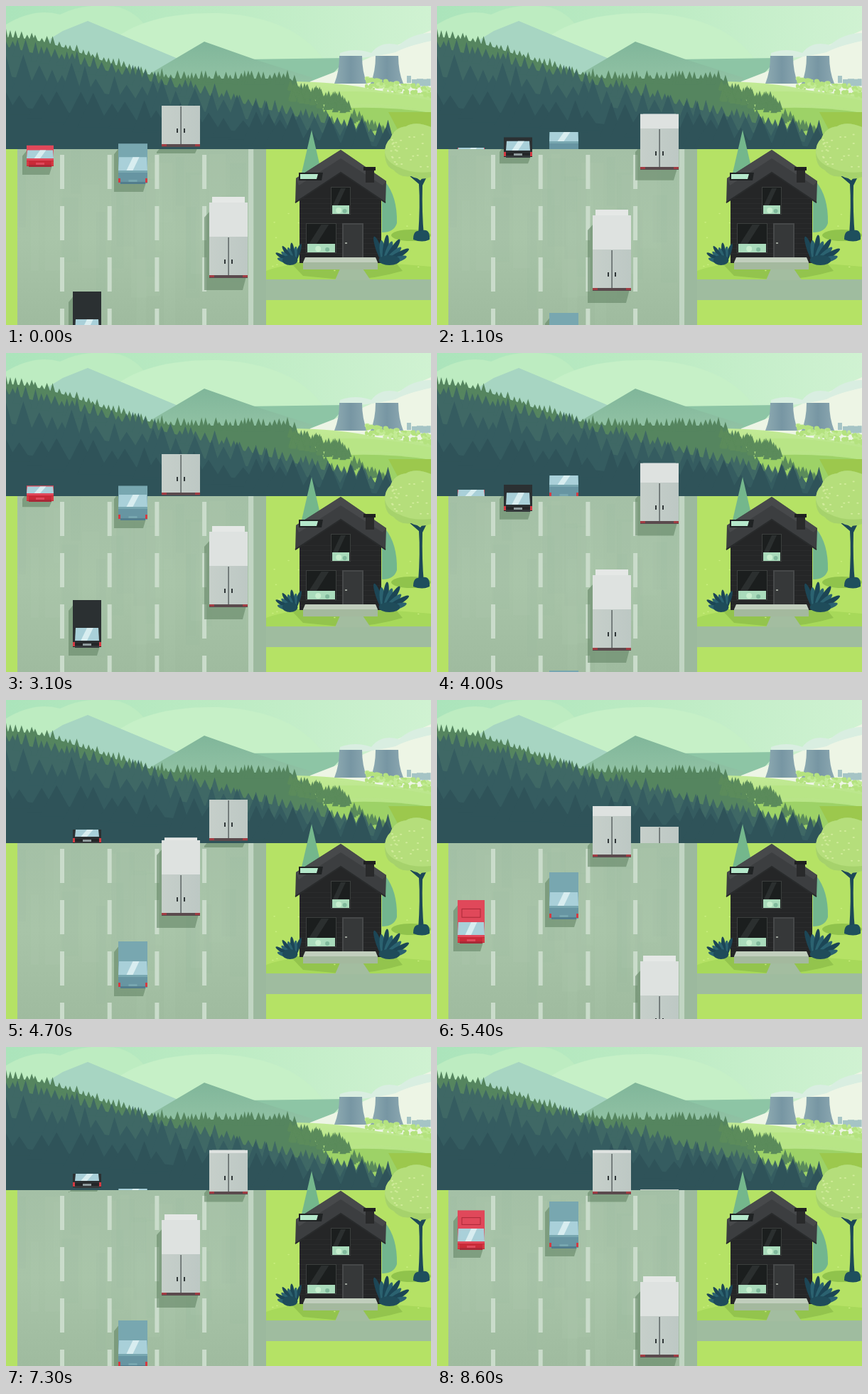
Recreate the animation shown at these times as an HTML page with a canvas. Size 598 by 448 pixels, loop 8700 ms.

```html
<!DOCTYPE html>
<html lang="en">
<head>
<meta charset="utf-8">
<title>Motorway and house</title>
<style>
html, body { margin: 0; width: 100%; height: 100%; overflow: hidden; background: #a3bfa5; }
canvas { display: block; width: 598px; height: 448px; }
</style>
</head>
<body>
<canvas id="stage" width="598" height="448"></canvas>
<script>
const W = 598, H = 448, HORIZON = 201, LOOP = 8700, STEP = 100, LAP = 29;
const stage = document.getElementById('stage').getContext('2d');
const backdrop = document.createElement('canvas');
backdrop.width = W;
backdrop.height = H;
let c = backdrop.getContext('2d');

const clamp = (v, lo, hi) => Math.max(lo, Math.min(hi, v));
const smooth = u => { u = clamp(u, 0, 1); return u * u * (3 - 2 * u); };

function rng(seed) {
  return () => (seed = (seed * 16807) % 2147483647) / 2147483647;
}
function rect(x, y, w, h, fill) {
  c.fillStyle = fill;
  c.fillRect(x, y, w, h);
}
function poly(fill, ...p) {
  c.fillStyle = fill;
  c.beginPath();
  for (let i = 0; i < p.length; i += 2) c.lineTo(p[i], p[i + 1]);
  c.fill();
}
function shape(fill, d) {
  c.fillStyle = fill;
  c.fill(new Path2D(d));
}
function oval(x, y, rx, ry, fill, turn = 0) {
  c.fillStyle = fill;
  c.beginPath();
  c.ellipse(x, y, rx, ry, turn, 0, 7);
  c.fill();
}
function line(color, width, d) {
  c.strokeStyle = color;
  c.lineWidth = width;
  c.stroke(new Path2D(d));
}
function shade(x0, y0, x1, y1, ...stops) {
  const g = c.createLinearGradient(x0, y0, x1, y1);
  stops.forEach((s, i) => g.addColorStop(i / (stops.length - 1), s));
  return g;
}
function clipTo(y, h, draw) {
  c.save();
  c.beginPath();
  c.rect(0, y, W, h);
  c.clip();
  draw();
  c.restore();
}

function fir(x, y, w, h, fill) {
  poly(fill, x, y - h, x + w / 2, y + h * 0.4, x - w / 2, y + h * 0.4);
}
// A band of firs on a ridge, filled down to the horizon
function firBand(ridge, end, w, h, fill, seed) {
  const rand = rng(seed), crest = [];
  for (let x = 0; x <= end; x += 10) crest.push(x, ridge(x));
  poly(fill, ...crest, end, HORIZON, 0, HORIZON);
  for (let x = 0; x < end; x += w * (0.4 + rand() * 0.5)) {
    fir(x, ridge(x) + 3, w * (0.8 + rand() * 0.5), h * (0.5 + rand() * 0.6), fill);
  }
}
// Loose firs scattered along a slope
function firClump(x0, x1, y, slope, depth, count, seed) {
  const rand = rng(seed);
  for (let i = 0; i < count; i++) {
    const x = x0 + rand() * (x1 - x0);
    fir(x, y + (x - x0) * slope + rand() * depth, 9, 10, '#5b8b5b');
  }
}

function drawSky() {
  rect(0, 0, W, HORIZON, shade(0, 0, 598, 60, '#abe4bb', '#bcebc3', '#d0f2d2'));
  shape('#bdecc1', 'M0 26Q40 2 76 12Q112 -6 160 2Q190 12 200 36L200 90H0Z');
  shape('#c6f0c7', 'M150 48Q200 8 300 10Q405 16 446 74L440 110H150Z');
  poly('#a7d5c2', 115, 21, 242, 74, 270, 110, 0, 110, 62, 46, 80, 35);
  poly('#8dc5a5', 335, 75, 480, 73, 448, 108, 350, 112);
  poly(shade(0, 50, 0, 105, '#80b69a', '#91c2a4'), 279, 50, 350, 75, 432, 101, 420, 115, 190, 112, 206, 93);
}

function drawValley() {
  shape('#edf5e5', 'M428 106L490 82L598 34V125H420Z');
  shape('#d9eee1', 'M470 66Q492 58 514 66Q528 48 553 55Q572 38 598 38V49Q565 56 548 65Q510 74 470 74Z');
  shape(shade(0, 106, 0, 200, '#c2ea96', '#a8db70'), 'M395 106Q470 106 520 118Q560 124 598 125V201H395Z');
  shape('#b8e586', 'M430 125Q500 112 598 133V150Q520 128 430 145Z');
  shape('#9dd267', 'M440 146Q520 138 598 150V201H500Z');
  for (const m of [485, 536]) {
    shape(shade(m - 23, 0, m + 23, 0, '#8eabb2', '#7796a3', '#8ca8b1'),
      `M${m - 16} 70H${m + 16}Q${m + 16} 92 ${m + 23} 109H${m - 23}Q${m - 16} 92 ${m - 16} 70Z`);
  }
  const rand = rng(41);
  for (let x = 564; x < W; x += 7) rect(x, 98 + rand() * 5, 4 + rand() * 5, 10, '#a5c4c5');
  for (let i = 0; i < 110; i++) {
    const x = 506 + rand() * 92;
    oval(x, 101 + (x - 506) * 0.13 + rand() * 14, 1.5 + rand() * 3, 1.5 + rand() * 2, i % 3 ? '#b4e27f' : '#c2eb94');
  }
}

function drawForest() {
  firBand(x => 44 + 58 * smooth(x / 250) + Math.max(0, x - 400), 490, 11, 14, '#55855f', 7);
  firClump(400, 484, 112, 0.24, 18, 90, 92);
  firClump(486, 545, 150, 0.6, 10, 28, 15);
  firBand(x => 57 + 0.24 * x, 540, 16, 20, '#3f6865', 23);
  firBand(x => 98 + 0.18 * x, 546, 30, 36, '#355c60', 58);
  firBand(x => 140 + 0.11 * x, 546, 38, 38, '#2f5359', 77);
}

function drawGround() {
  rect(0, HORIZON, W, H, '#b5e265');
  rect(16, HORIZON, 350, H, shade(0, 200, 0, 448, '#a4c0a6', '#a8c4a8', '#9fbb9f'));
  const rand = rng(16);
  for (let i = 0; i < 28; i++) {
    rect(18 + rand() * 300, HORIZON + rand() * 90, 8 + rand() * 20, 60 + rand() * 120,
      i % 2 ? 'rgba(175,202,172,.15)' : 'rgba(145,177,152,.12)');
  }
  rect(349, HORIZON, 17, H, '#9cb99e');
  for (let lane = 0; lane < 4; lane++) {
    for (let y = 209; y < H; y += 72) rect(76 + lane * 66.7, y, 6, 48, '#cadccb');
  }
  rect(341, HORIZON, 7, H, '#c1d5c3');
  poly('#9cc84d', 538, 149, 598, 149, 598, 201, 566, 201);
  shape('#a7d95a', 'M366 372Q420 350 598 366V384H366Z');
  shape('#93c44d', 'M400 360H548L558 372Q510 386 470 384L418 379Z');
  rect(366, 384, 232, 29, '#9fbc9f');
  poly('#a3bda0', 470, 369, 502, 369, 513, 385, 463, 385);
  for (let i = 0; i < 24; i++) oval(374 + rand() * 218, 285 + rand() * 96, 1.3, 0.8, '#caee80');
}

// A fan of pointed leaves spreading to one side
function drawBush(x, y, size, side) {
  for (let i = 0; i < 8; i++) {
    const a = -Math.PI / 2 + side * (i * 0.23 - 0.35), r = size * (i % 2 ? 0.45 : 0.55);
    oval(x + Math.cos(a) * r, y + Math.sin(a) * r, r, size * 0.11, i % 2 ? '#2b6270' : '#1c4656', a);
  }
  oval(x + side * size * 0.2, y - 5, size * 0.4, 7, '#1f4c5a');
}

function drawGarden() {
  poly('#74b78c', 430, 174, 446, 243, 414, 243);
  shape('#72b68f', 'M533 246Q551 268 550 305Q546 318 529 318V246Z');
  oval(570, 322, 28, 8, '#90c34c');
  shape('#1d4858', 'M580 322Q583 280 581 250L567 238L570 236L583 245L590 236L593 238L586 252Q585 290 588 322Z');
  shape('#1e4f5d', 'M573 328Q573 314 583 316Q597 311 596 328Q586 333 573 328Z');
  shape('#a6d26c', 'M533 208Q533 193 541 186Q546 171 563 169Q576 161 598 170V240Q584 246 570 239Q555 242 545 230Q534 226 533 208Z');
  shape('#b5de7b', 'M533 206Q533 193 541 186Q546 171 563 169Q576 161 598 170V233Q570 236 552 226Q536 220 533 206Z');
  const rand = rng(34);
  for (let i = 0; i < 28; i++) oval(542 + rand() * 54, 180 + rand() * 50, 1.6, 1, '#d1ec9b');
}

function drawWindow(x, y, w, h) {
  const sill = y + h - 13;
  rect(x, y, w, h, '#3c3f3e');
  rect(x + 1, y + 1, w - 2, h - 2, '#1b1e1e');
  poly('#2b2f2f', x + w * 0.5, y + 2, x + w * 0.75, y + 2, x + w * 0.35, sill, x + w * 0.1, sill);
  rect(x + 2, sill, w - 4, 12, '#a9dbbb');
  oval(x + w * 0.4, sill + 7, 4, 4, '#c8efcf');
  oval(x + w * 0.7, sill + 8, 3, 3, '#80b99c');
}

function drawHouse() {
  poly('#252627', 413, 268, 471, 229, 528, 268, 528, 361, 413, 361);
  for (let y = 270; y < 358; y += 7) rect(413, y, 115, 1, '#2b2c2d');
  poly('#3c3e40', 471, 202, 535, 246, 534, 277, 471, 234, 407, 277, 408, 242);
  poly('#47494b', 471, 202, 535, 246, 530, 252, 471, 214, 412, 252, 408, 242);
  line('#292b2c', 2, 'M407 276L471 234L534 276');
  rect(503, 226, 17, 5, '#202122');
  rect(506, 231, 12, 17, '#292a2b');
  poly('#202324', 412, 234, 446, 234, 444, 245, 412, 245);
  poly('#b5e8cb', 414, 236, 439, 236, 437, 243, 414, 243);
  drawWindow(457, 254, 28, 39);
  drawWindow(422, 305, 43, 42);
  rect(473, 305, 30, 56, '#464849');
  rect(475, 307, 26, 54, '#363839');
  rect(477, 332, 3, 2, '#999f98');
  drawBush(405, 362, 27, -1);
  drawBush(532, 362, 37, 1);
  poly('#c1cebd', 421, 353, 520, 353, 523, 360, 418, 360);
  rect(418, 360, 105, 10, '#a4b99e');
}

// apex: frame at the crest; crest, pull, ease and sink shape the path over it.
// win and roof: [smallest or start, growth per pixel, largest]
const VEHICLES = [
  { x: 29, w: 38, apex: 4.2, crest: 196, pull: 1.72, ease: 0, sink: 0.3, back: 12,
    win: [9, 0.12, 18], roof: [205, 0.32, 31], body: '#e0485a', rear: '#c92a38', trim: '#a92937', panel: true },
  { x: 94, w: 40, apex: 14.4, crest: 198, pull: 1.3, ease: 0, sink: 0.4, back: 10,
    win: [10, 0.35, 18], roof: [204, 0.6, 39], body: '#2b3032', rear: '#242628', trim: '#34393b', inset: 3 },
  { x: 158, w: 41, apex: 8, crest: 200, pull: 1.18, ease: 0.065, sink: 1, back: 19,
    win: [13, 0.13, 19], roof: [205, 0.42, 28], body: '#78a7b0', rear: '#6795a2', trim: '#527d8d' },
  { x: 219, w: 54, apex: 0.2, crest: 198, pull: 1.03, ease: 0.038, sink: 1 },
  { x: 286, w: 54, apex: 17.2, crest: 198, pull: 1.03, ease: 0.038, sink: 1 }
];

// Rear bumper height, u frames from the crest: a parabola easing into a straight run
function bumper(v, u) {
  return Math.round(v.crest + v.pull * u * u / (1 + v.ease * Math.abs(u)) * (u > 0 ? v.sink : 1));
}

function drawShadow(x, w, top, b, off, drop) {
  const y = Math.max(HORIZON, top + drop);
  clipTo(HORIZON, H, () => poly('rgba(101,134,103,.6)', x + 2, y - 6, x - off, y + 4, x - off, b + drop,
    x + w - off, b + drop, x + w - 2, b - 2, x + 2, b - 2));
}

function drawTruck(v, b, sunk) {
  const { x, w } = v, rear = b - 58;
  const roof = sunk ? 0 : clamp((b - 201) * 0.7, 0, 48), top = rear - roof;
  const nub = sunk ? 0 : clamp((b - 265) * 0.1, 0, 8);
  if (!sunk) drawShadow(x, w, top, b, 7, clamp(9 + (b - 198) * 0.18, 9, 17));
  rect(x + 4, top - nub, w - 8, nub + 1, '#e5e8e6');
  rect(x, top, w, roof + 1, '#dee2e0');
  rect(x, rear, w, 55, shade(x, 0, x + w, 0, '#c6cfca', '#bdc8c4'));
  rect(x + w / 2 - 0.5, rear + 1, 1.2, 53, '#424b4c');
  for (const dx of [21, 31]) rect(x + dx, b - 26, 2, 6, '#303738');
  rect(x, b - 4, w, 4, '#5a4a4d');
  for (const dx of [0, w - 7]) rect(x + dx, b - 4, 7, 3, '#a13c43');
}

function drawCar(v, b, sunk) {
  const { x, w, inset = 0 } = v, [low, grow, high] = v.win, [from, rate, full] = v.roof;
  const rise = sunk ? 0 : Math.max(0, b - from);
  const win = Math.min(low + rise * grow, high), roof = Math.min(rise * rate, full);
  const tail = b - v.back, glass = tail - win, top = glass - roof;
  const l = x + inset, r = x + w - inset;
  if (!sunk) drawShadow(x, w, top, b, 6, clamp(5 + (b - 200) * 0.25, 5, 11));
  rect(x, top, w, tail - top + 2, v.body);
  if (v.panel && roof > 9) {
    c.strokeStyle = v.trim;
    c.lineWidth = 1;
    c.strokeRect(x + 6, top + roof * 0.4, w - 12, roof * 0.38);
  }
  poly('#a9d0d9', l + 1, glass, r - 1, glass, r, tail, l, tail);
  poly('#d8edf0', x + w * 0.5, glass, x + w * 0.72, glass, x + w * 0.5, tail, x + w * 0.28, tail);
  rect(x, tail, w, v.back - 1, v.rear);
  rect(x, tail, w, 3, v.body);
  rect(x + 3, b - 3, w - 6, 3, v.trim);
  for (const dx of [0, w - 3]) rect(x + dx, b - 8, 3, 6, '#d43b43');
  rect(x + w / 2 - 6, b - 6, 12, 3, v.inset ? '#8e9a9c' : v.body);
}

function drawTraffic(frame) {
  for (const v of VEHICLES) {
    const draw = v.back ? drawCar : drawTruck;
    const past = (frame - v.apex + LAP) % LAP;
    // One vehicle sinks beyond the crest while the next one climbs to it
    clipTo(0, HORIZON, () => draw(v, bumper(v, past), true));
    draw(v, bumper(v, past - LAP), false);
  }
}

// Traffic runs a touch behind the clock and holds once near the end of the loop
function trafficFrame(k) {
  return k - smooth((k - 22) / 18) - (k >= 85 ? 1 : 0);
}

drawSky();
drawValley();
drawForest();
drawGround();
drawGarden();
drawHouse();
c = stage;

const start = performance.now();
function tick() {
  const t = Math.max(0, performance.now() - start) % LOOP;
  c.drawImage(backdrop, 0, 0);
  drawTraffic(trafficFrame(Math.floor(t / STEP)));
  requestAnimationFrame(tick);
}
tick();
</script>
</body>
</html>
```
